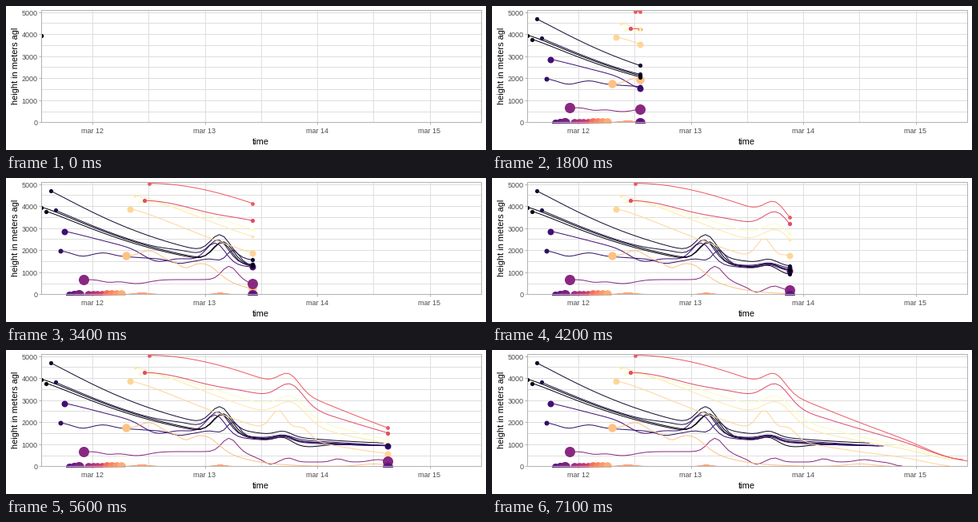
Write a matplotlib script that moves like this. It is 600x180 px and loops after 7.2 s.

```python
import matplotlib.pyplot as plt
import numpy as np
from matplotlib.animation import FuncAnimation
from matplotlib.patches import Rectangle

W, H, DPI = 600, 180, 100
PX = 72 / DPI                       # points per pixel
FRAMES, INTERVAL = 72, 100
LEFT, RIGHT, TOP, BOTTOM = 44, 594, 5, 145
HOURS, LIFE = 94, 71                # time span, length of one trajectory
GRID, BORDER, LABEL = "#dedede", "#b3b3b3", "#4d4d4d"

plt.rcParams["font.family"] = "Liberation Sans"
magma = plt.get_cmap("magma")

fig = plt.figure(figsize=(W / DPI, H / DPI), dpi=DPI, facecolor="white")
ax = fig.add_axes([0, 0, 1, 1])
ax.set_xlim(0, W)
ax.set_ylim(H, 0)
ax.axis("off")
clip = Rectangle((LEFT, TOP), RIGHT - LEFT + 1, BOTTOM - TOP + 1,
                 transform=ax.transData)


def hour_x(hour):
    return 44.2 + 5.854 * hour


def rule(xs, ys, color, z=1):
    ax.plot(np.floor(xs), np.floor(ys), color=color, lw=PX, zorder=z,
            solid_capstyle="butt", snap=True)


def label(x, y, text, size, color=LABEL, **kw):
    ax.text(x, y, text, fontsize=size * PX, color=color, va="baseline", **kw)


def draw_panel():
    for height in range(0, 5001, 500):
        y = 145.8 - 0.02755 * height
        rule([LEFT, RIGHT], [y, y], GRID)
        if height % 1000 == 0:
            rule([LEFT - 3, LEFT], [y, y], BORDER)
            label(39.7, y + 3.6, str(height), 9, ha="right")
    for i in range(7):
        x = hour_x(11 + 12 * i)
        rule([x, x], [TOP, BOTTOM], GRID)
        if i % 2 == 0:
            rule([x, x], [BOTTOM, BOTTOM + 3], BORDER)
            label(x - 0.6, 158.8, f"mar {12 + i // 2}", 9, ha="center")
    rule([LEFT, RIGHT, RIGHT, LEFT, LEFT],
         [TOP, TOP, BOTTOM, BOTTOM, TOP], BORDER, z=9)
    label(318.3, 172.8, "time", 11, "black", ha="center")
    label(15, 75, "height in meters agl", 11, "black", ha="center",
          rotation=90, rotation_mode="anchor")


def fall(x, x0, top, floor, reach, power):
    """Stretched exponential descent from top towards floor."""
    return floor - (floor - top) * np.exp(-((x - x0) / reach) ** power)


def sigmoid(x, center, width):
    return 1 / (1 + np.exp(-(x - center) / width))


def bumps(x, *parts):
    """Sum of bells, each given as (center, width, shift in pixels)."""
    return sum(d * np.exp(-((x - c) / w) ** 2) for c, w, d in parts)


def shade(start):
    # the last two runs rank in the middle of the palette
    rank = start - 8 if start > 21 else start + 2 * (start >= 14)
    return magma(rank / 23)


class Trajectory:
    def __init__(self, start, radius, shape):
        self.start = start
        self.x = hour_x(np.arange(start, start + LIFE + 1))
        self.y = np.minimum(shape(self.x), BOTTOM + 0.5)
        color = shade(start)
        dot = dict(marker="o", ms=2 * radius * PX, mew=0, ls="none")
        self.line = self.artist(color, 3, lw=PX)
        self.origin = self.artist(color, 4 + start / 100, **dot)
        self.head = self.artist(color, 6 - start / 100, **dot)

    @staticmethod
    def artist(color, z, **kw):
        item, = ax.plot([], [], color=color, zorder=z, **kw)
        item.set_clip_path(clip)
        return item

    def show(self, hour):
        n = min(max(hour - self.start + 1, 0), LIFE + 1)
        alive = self.start <= hour <= self.start + LIFE and hour < HOURS
        at = slice(n - 1, n) if alive else slice(0, 0)
        self.line.set_data(self.x[:n], self.y[:n])
        self.origin.set_data(self.x[:min(n, 1)], self.y[:min(n, 1)])
        self.head.set_data(self.x[at], self.y[at])


def sinking(start, offset, fade, *extra):
    """Shared descent with two crests; the offset fades out along the way."""
    def shape(x):
        return (fall(x, 44, 36.5, 122, 155, 1.22)
                + offset * np.exp(-(x - x[0]) / fade)
                + bumps(x, (272 - 2 * start, 17, -25), (347, 14, -6), *extra))
    return Trajectory(start, 2.6 if start < 4 else 4, shape)


def gliding(start, radius, top, floor, reach, power, *extra):
    """High run that crosses a ridge and eases down to the ground."""
    def shape(x):
        return (fall(x, x[0], top, floor, reach, power)
                + bumps(x, (575, 45, 7), *extra))
    return Trajectory(start, radius, shape)


def ground(start):
    radius = min(4.5 + start - 6, 6.5) if start < 9 else 5.3
    lift = -1.8 if start > 13 else 0
    return Trajectory(start, radius, lambda x: BOTTOM + 0.5 + bumps(
        x, (170, 9, lift), (268, 6, lift)))


def shallow(x):
    return 93 + 0.065 * (x - 67) + bumps(
        x, (67, 12, -2), (95, 12, 3), (123, 14, -3), (216, 14, 4),
        (255, 14, -4), (284, 11, -17), (347, 16, -5))


def low(x):
    return 127 + 13 * sigmoid(x, 310, 8) + bumps(
        x, (128, 12, 3), (163, 22, 5), (279, 13, -17), (330, 8, 4),
        (353, 10, -5), (415, 10, -4), (465, 14, -3), (512, 14, 5))


def plunge(x):
    return 96 + 49.5 * sigmoid(x, 255, 30) + bumps(
        x, (180, 16, -9), (224, 9, 5), (252, 20, -11), (460, 25, -3))


draw_panel()
runs = [
    sinking(0, 0, 200),
    sinking(1, 3.5, 200, (375, 25, 5)),
    sinking(2, -24, 200),
    sinking(3, -2, 200, (225, 30, -4)),
    Trajectory(4, 3, shallow),
    sinking(5, 19.5, 100, (187, 22, 10)),
    Trajectory(9, 6.5, low),
    Trajectory(18, 5.2, plunge),
    gliding(19, 4, 39, 145, 195, 1.3, (341, 14, -28), (370, 14, -14)),
    gliding(20, 2, 22, 145, 235, 1.3, (357, 25, -24)),
    gliding(21, 2, 30, 145, 270, 1.6, (357, 24, -22)),
    gliding(22, 2.6, 28, 165, 345, 1.75, (255, 45, 5), (356, 22, -24)),
    gliding(23, 2.4, 6.5, 165, 325, 1.9, (354, 18, -19)),
]
runs += [ground(s) for s in (6, 7, 8, *range(10, 18))]


def update(frame):
    # newest hourly record whose rounded position falls on this frame
    hour = int((frame + 0.5) * HOURS / (FRAMES - 1))
    for run in runs:
        run.show(hour)
    return []


anim = FuncAnimation(fig, update, frames=FRAMES, interval=INTERVAL,
                     init_func=lambda: update(0), repeat=True, blit=False)
plt.show()
```
